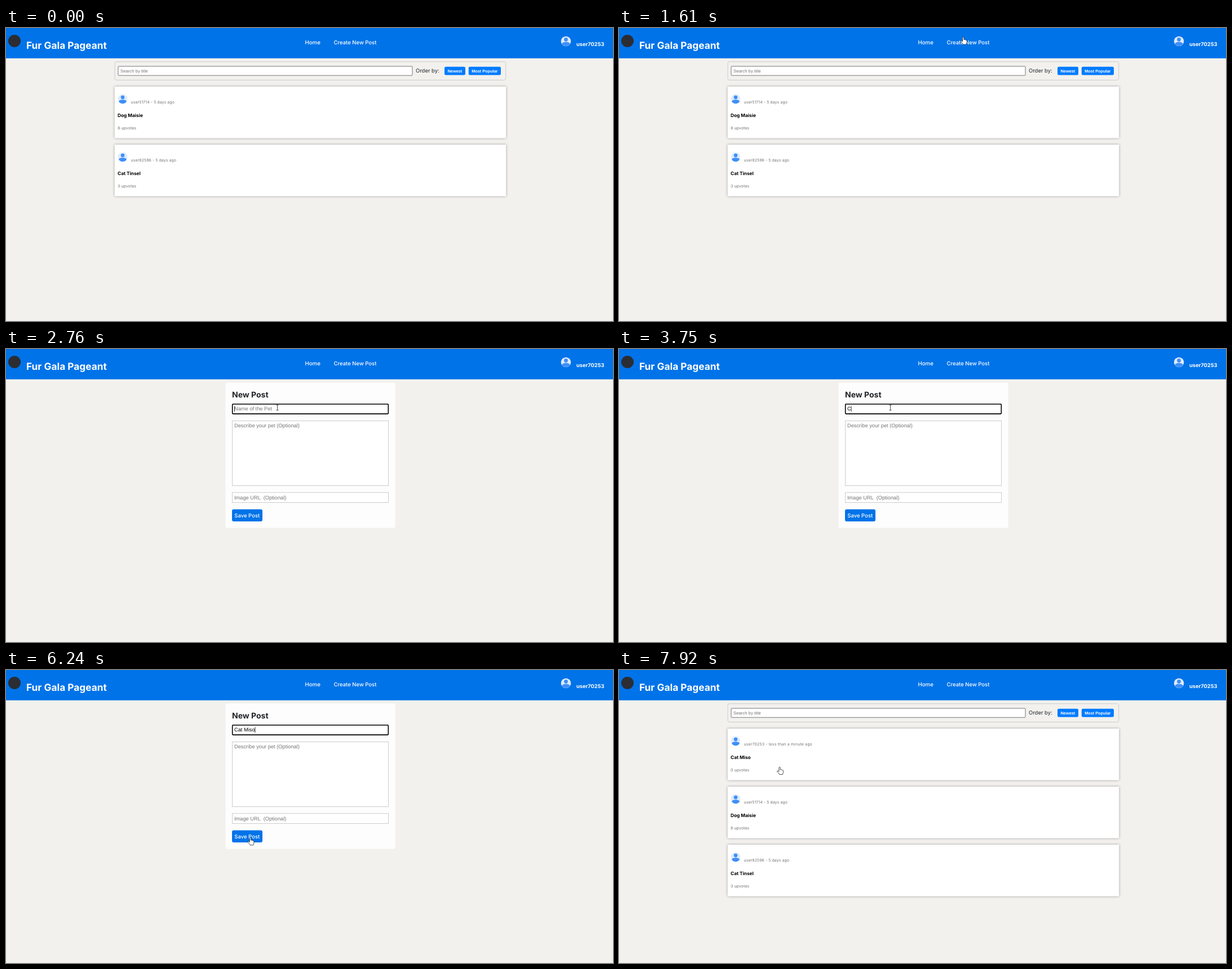
Animation, 1077 px wide and 520 px high, one loop 7990 ms. Source, as an HTML page:

```html
<!DOCTYPE html>
<html lang="en">
<head>
<meta charset="utf-8">
<title>Fur Gala Pageant</title>
<style>
  html, body { margin: 0; width: 100%; height: 100%; overflow: hidden; background: #f2f1ee; }
  svg { display: block; width: 1077px; height: 520px; }
  text { white-space: pre; text-rendering: geometricPrecision; }
  .ui { font-family: Inter, "Open Sans", sans-serif; }
  .field { font-family: "Liberation Sans", Arial, sans-serif; }
  .card { filter: drop-shadow(0 0 2px rgba(0, 0, 0, .35)); }
</style>
</head>
<body>
<svg id="stage" viewBox="0 0 1077 520"></svg>
<script>
const LOOP = 7990;
const STEP = 68;
const BLUE = '#0073e9', GREY = '#757575', INK = '#212529';
const FORM_AT = 1870, LIST_AT = 7310;
const FOCUS_AT = 2540, BLUR_AT = 6910, SAVING_AT = 7180;

// ---- drawing helpers ----
const text = (cls, x, y, size, weight, fill, str, extra = '') =>
  `<text class="${cls}" x="${x}" y="${y}" font-size="${size}" font-weight="${weight}" fill="${fill}" ${extra}>${str}</text>`;
const ui = (...a) => text('ui', ...a);
const field = (...a) => text('field', ...a);
const rect = (x, y, w, h, fill, extra = '') =>
  `<rect x="${x}" y="${y}" width="${w}" height="${h}" fill="${fill}" ${extra}/>`;
const MID = 'text-anchor="middle"';

const avatar = (x, y, r) => `<g transform="translate(${x} ${y}) scale(${r / 8.5})">
  <circle r="8.5" fill="#dfebfd"/><circle cy="-2.9" r="3.3" fill="#3f8ff8"/>
  <path d="M-7 4.6C-6.4 0 6.4 0 7 4.6A8.5 8.5 0 0 1 -7 4.6Z" fill="#3f8ff8"/></g>`;

const post = (slot, user, age, title, votes, space = .05) => `<g transform="translate(0 ${slot * 103})">
  ${rect(192.7, 104, 694.5, 91.5, '#fff', 'class="card"')}
  ${avatar(207, 126, 8.5)}
  ${ui(221.5, 134, 7, 400, GREY, `${user} - ${age} ago`, `letter-spacing="${space}"`)}
  ${ui(198, 157.5, 8.3, 700, '#000', title)}
  ${ui(198, 180, 7.1, 400, GREY, votes + ' upvotes')}</g>`;

const header = rect(0, 0, 1077, 53.8, BLUE) +
  '<circle cx="15" cy="23" r="11" fill="#2b2d33"/>' +
  ui(36, 36.7, 17.3, 700, '#fff', 'Fur Gala Pageant') +
  ui(530.5, 29, 9.7, 500, '#fff', 'Home') +
  ui(581.5, 29, 9.5, 500, '#fff', 'Create New Post') +
  avatar(993.5, 23.5, 8.8) +
  ui(1061.5, 32.4, 9.3, 700, '#fff', 'user70253', 'text-anchor="end"');

const toolbar = rect(193, 59.8, 693.7, 32.6, 'none', 'rx="3" stroke="#ccc"') +
  rect(199, 68, 522, 16.2, '#fff', 'rx="1" stroke="#767676"') +
  field(203, 79, 7.73, 400, GREY, 'Search by title') +
  ui(727, 79.4, 9.45, 400, INK, 'Order by:') +
  rect(778, 68.8, 37, 14.6, '#007bff', 'rx="2.5"') +
  rect(820.8, 68.8, 57.2, 14.6, '#007bff', 'rx="2.5"') +
  field(796.4, 78.8, 7.4, 700, '#fff', 'Newest', MID) +
  field(849.3, 78.8, 7.3, 700, '#fff', 'Most Popular', MID);

const box = (y, h) => rect(401.5, y, 277, h, '#fff', 'stroke="#ccc"');
const form = rect(389.5, 59.5, 301, 258, '#fdfdfd', 'rx="3"') +
  ui(401, 86.3, 14, 700, INK, 'New Post') +
  box(97.5, 17.8) + box(127.5, 115) + box(254.7, 17.8) +
  field(405, 139.3, 9.27, 400, GREY, 'Describe your pet (Optional)') +
  field(405, 266.8, 9.27, 400, GREY, 'Image URL  (Optional)') +
  rect(401, 284.6, 54, 21.4, BLUE, 'rx="3"') +
  ui(427.8, 298.5, 9.5, 500, '#fff', 'Save Post', MID) +
  rect(401.7, 97.7, 276.6, 17.4, '#fff', 'id="focus" rx="1.5" stroke="#000" stroke-width="1.6"') +
  field(405, 109.3, 9.27, 400, GREY, 'Name of the Pet', 'id="hint"') +
  field(405, 109.3, 9.27, 400, '#000', '', 'id="typed"') +
  rect(405, 101.4, .8, 9.8, '#000', 'id="caret"');

const older = from =>
  post(from, 'user51714', '5 days', 'Dog Maisie', 8) +
  post(from + 1, 'user82596', '5 days', 'Cat Tinsel', 3);

const pointer = 'stroke="#222" stroke-width=".8" stroke-linejoin="round" fill="#fff"';
const cursors = `
  <path id="arrow" ${pointer} d="M0 0V10L2.3 8 3.8 11.4 5.4 10.7 3.9 7.4H7Z"/>
  <path id="hand" ${pointer} d="M-1.2 8.4V1.2C-1.2-.2 1.1-.2 1.1 1.2V5C1.3 4.2 3.2 4.3 3.2 5.4 3.6 4.8 5 5 5 6 5.4 5.5 6.4 5.8 6.4 6.8V9.5C6.4 11 5.6 11.8 5.4 13.4H-.4C-.6 12-4 9.3-4.4 7.8-4.6 6.6-3.3 6.3-2.6 7.1Z"/>
  <path id="beam" fill="none" stroke="#333" stroke-width=".9" d="M-2-4.6H2M0-4.6V4.6M-2 4.6H2"/>`;

document.getElementById('stage').innerHTML = header +
  `<g id="before">${toolbar}${older(0)}</g>
   <g id="form">${form}</g>
   <g id="after">${toolbar}${post(0, 'user70253', 'less than a minute', 'Cat Miso', 0, .13)}${older(1)}</g>
   <g id="cursor">${cursors}</g>`;

const $ = id => document.getElementById(id);
const show = (id, on) => $(id).setAttribute('visibility', on ? 'inherit' : 'hidden');
const page = (id, on) => $(id).setAttribute('display', on ? 'inline' : 'none');

// ---- timing ----
// Cursor runs: [time, x, y] points, sampled in even steps
const runs = [
  [[370, 1005, 495], [580, 828, 388], [846, 593.5, 238], [980, 562, 155], [1118, 550, 83]],
  [[1180, 556, 74], [1450, 598, 32], [1590, 611, 15.5], [1790, 614, 22], [1930, 613.2, 24]],
  [[2010, 606, 30], [2150, 545, 66], [2350, 481, 99]],
  [[2540, 481, 100], [2740, 481.5, 104]],
  [[5410, 479.5, 101], [5546, 474, 128], [5818, 447, 225], [6022, 427, 284], [6158, 432, 295]],
  [[6240, 433.5, 297.3]],
  [[7640, 415, 286], [7776, 340, 228], [7912, 285, 172]]
];

const keys = [[3750, 1], [3880, 2], [4150, 3], [4280, 4], [4480, 5], [4750, 6], [4880, 7], [5010, 8]];
const caretOff = [[3020, 3420], [5540, 6100], [6640, BLUR_AT]];

// Hover zones: [left, top, right, bottom, cursor]
const nav = [581, 15, 658, 36, 'hand'];
const search = [199, 68, 721, 83, 'beam'];
const cards = [0, 1, 2].map(i => [193, 104 + i * 103, 887, 195 + i * 103, 'hand']);
const zones = {
  before: [nav, search, ...cards.slice(0, 2)],
  form: [nav, [401, 97, 679, 115, 'beam'], [401, 127, 679, 242, 'beam'],
    [401, 254, 679, 273, 'beam'], [401, 284, 455, 306, 'hand']],
  after: [nav, search, ...cards]
};

function cursorAt(t) {
  const run = runs.filter(r => r[0][0] <= t).pop();
  if (!run) return null;
  const start = run[0][0];
  const q = start + Math.floor((t - start + 3) / STEP) * STEP;
  const i = run.findIndex(p => p[0] > q);
  if (i < 0) return run[run.length - 1].slice(1);
  const a = run[i - 1], b = run[i], k = (q - a[0]) / (b[0] - a[0]);
  return [a[1] + (b[1] - a[1]) * k, a[2] + (b[2] - a[2]) * k];
}

function shapeAt(name, t, [x, y]) {
  if (t >= SAVING_AT && t < 7640) return 'arrow';
  const z = zones[name].find(([l, top, r, b]) => x >= l && x <= r && y >= top && y <= b);
  return z ? z[4] : 'arrow';
}

function draw(t) {
  const name = t < FORM_AT ? 'before' : t < LIST_AT ? 'form' : 'after';
  for (const id of ['before', 'form', 'after']) page(id, id === name);

  const count = keys.filter(k => k[0] <= t).length;
  const focused = t >= FOCUS_AT && t < BLUR_AT;
  $('typed').textContent = 'Cat Miso'.slice(0, count);
  show('hint', !count);
  show('focus', focused);
  show('caret', focused && !caretOff.some(([a, b]) => t >= a && t < b));
  if (name === 'form') $('caret').setAttribute('x', 405 + (count ? $('typed').getComputedTextLength() : 0));

  const pos = cursorAt(t);
  show('cursor', pos);
  if (!pos) return;
  $('cursor').setAttribute('transform', `translate(${pos[0]} ${pos[1]})`);
  const shape = shapeAt(name, t, pos);
  for (const id of ['arrow', 'hand', 'beam']) show(id, id === shape);
}

const begin = performance.now();
function tick() {
  draw((performance.now() - begin) % LOOP);
  requestAnimationFrame(tick);
}
tick();
</script>
</body>
</html>
```
